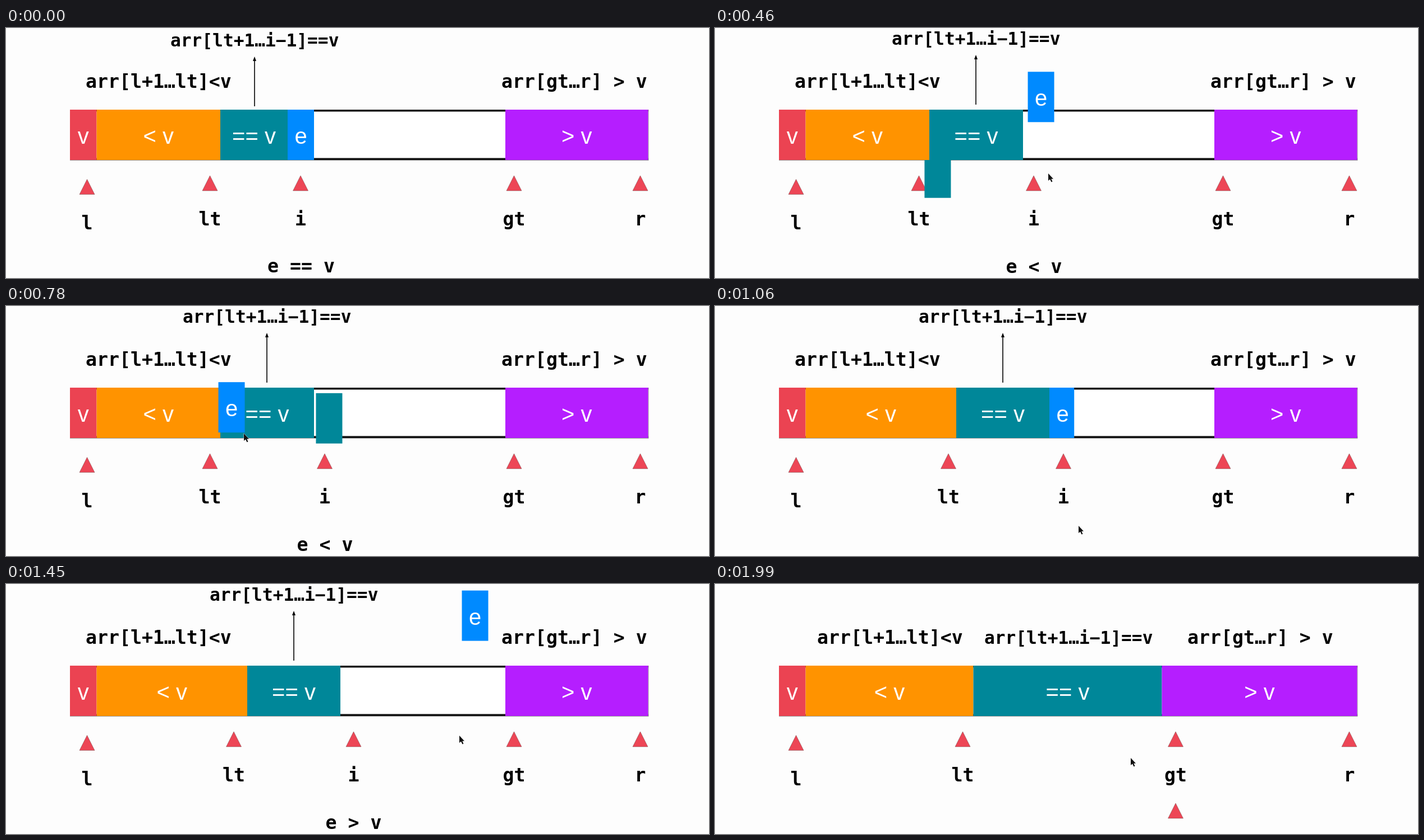
An HTML page with a canvas that plays this animation: 1253 by 447 pixels, repeating every 2070 ms.

```html
<!DOCTYPE html>
<html lang="en">
<head>
<meta charset="utf-8">
<title>Three-way partition</title>
<style>
html, body { margin: 0; width: 100%; height: 100%; overflow: hidden; background: #fdfdfd; }
canvas { display: block; }
</style>
</head>
<body>
<canvas id="stage" width="1253" height="447"></canvas>
<script>
const ctx = document.getElementById('stage').getContext('2d');
const LOOP = 2070;
// Moments at which the picture is refreshed.
const TICKS = [0, 110, 180, 250, 320, 390, 460, 540, 610, 690, 780, 840, 910, 980, 1060,
  1140, 1220, 1300, 1380, 1450, 1540, 1610, 1680, 1760, 1830, 1910, 1990];
const TOP = 146, HEIGHT = 90, CELL = 47, LEFT = 114, RIGHT = 1144.5;
const RED = '#eb4352', ORANGE = '#ff9300', TEAL = '#008799', BLUE = '#008aff', PURPLE = '#b51eff';
const MONO = '"DejaVu Sans Mono", monospace';
const SANS = '"Liberation Sans", Arial, sans-serif';

// Piecewise linear value through [time, value] keys.
function track(t, keys) {
  if (t <= keys[0][0]) return keys[0][1];
  for (let k = 1; k < keys.length; k++) {
    const [t0, a] = keys[k - 1], [t1, b] = keys[k];
    if (t < t1) return a + (b - a) * (t - t0) / (t1 - t0);
  }
  return keys[keys.length - 1][1];
}

function mono(str, x, baseline, size = 33.2, align = 'left') {
  ctx.font = `bold ${size}px ${MONO}`;
  ctx.textAlign = align;
  ctx.fillStyle = '#000';
  ctx.fillText(str, x, baseline);
}

function block(x, width, color, label = '', y = TOP) {
  ctx.fillStyle = color;
  ctx.fillRect(x, y, width, HEIGHT);
  ctx.font = `40px ${SANS}`;
  ctx.textAlign = 'center';
  ctx.fillStyle = '#fff';
  ctx.fillText(label, x + width / 2, y + 61);
}

function triangle(x, top) {
  ctx.beginPath();
  ctx.moveTo(x, top);
  ctx.lineTo(x + 13.5, top + 27);
  ctx.lineTo(x - 13.5, top + 27);
  ctx.closePath();
  ctx.fillStyle = '#ed4656';
  ctx.fill();
  ctx.lineWidth = 0.8;
  ctx.strokeStyle = 'rgba(90, 60, 60, .55)';
  ctx.stroke();
}

function pointer(name, x, drop = 0) {
  triangle(x, 264 + drop);
  mono(name, x, 353 + drop, 33.2, 'center');
}

function arrow(x, top) {
  ctx.fillStyle = '#000';
  ctx.fillRect(x - 0.8, top + 5, 1.6, 84);
  ctx.beginPath();
  ctx.moveTo(x, top);
  ctx.lineTo(x + 3, top + 8);
  ctx.lineTo(x - 3, top + 8);
  ctx.fill();
}

// The whole array; `loose` is a teal cell passing behind the coloured ranges.
function bar(orangeEnd, tealEnd, purpleStart, loose) {
  ctx.fillStyle = 'rgba(0, 0, 0, .4)';
  ctx.fillRect(LEFT, TOP + HEIGHT, RIGHT - LEFT + 1, 1);
  ctx.fillRect(RIGHT, TOP, 1, HEIGHT);
  ctx.fillStyle = '#111';
  ctx.fillRect(LEFT, TOP, RIGHT - LEFT, HEIGHT);
  ctx.fillStyle = '#fff';
  ctx.fillRect(LEFT, TOP + 3.5, RIGHT - LEFT, HEIGHT - 7);
  if (loose) block(loose.x, CELL, TEAL, '', loose.y);
  block(LEFT, 161.5 - LEFT, RED, 'v');
  block(161.5, orangeEnd - 161.5, ORANGE, '< v');
  block(orangeEnd, tealEnd - orangeEnd, TEAL, '== v');
  block(purpleStart, RIGHT - purpleStart, PURPLE, '> v');
}

// The blue cell, revealed from left to right.
function current(x, reveal) {
  if (reveal <= 0) return;
  ctx.save();
  ctx.beginPath();
  ctx.rect(x, TOP, CELL * Math.min(reveal, 1), HEIGHT + 1);
  ctx.clip();
  block(x, CELL, BLUE, 'e');
  ctx.restore();
}

// Arc from one cell to another; a positive lift goes upwards.
function arc(t, start, from, to, lift) {
  const u = Math.min(Math.max((t - start) / 483, 0), 1);
  const p = (1 - Math.cos(Math.PI * u)) / 2;
  const bulge = 3 * p * (1 - p);
  const side = Math.sign(from - to) * 69;
  return {
    x: from + (to - from) * p * p * (3 - 2 * p) + side * bulge * (1 - 2 * p),
    y: TOP - lift * bulge
  };
}

function cursor(t) {
  if (t < 390) return;
  const x = track(t, [[390, 575], [460, 594], [780, 424], [1060, 648], [1140, 655], [1450, 808], [1830, 741]]);
  const y = track(t, [[390, 280], [460, 260], [780, 228], [1060, 393], [1140, 292], [1450, 271], [1830, 311]]);
  ctx.save();
  ctx.translate(x, y);
  ctx.fillStyle = '#111';
  ctx.strokeStyle = 'rgba(255, 255, 255, .8)';
  ctx.lineWidth = 1;
  const shape = new Path2D('M0 0V13L3 10.5L5.5 15.5L7.5 14.5L5.3 9.7H9Z');
  ctx.stroke(shape);
  ctx.fill(shape);
  ctx.restore();
}

function partitioned() {
  mono('arr[l+1…lt]<v', 182, 107);
  mono('arr[lt+1…i−1]==v', 480, 107, 31.2);
  mono('arr[gt…r] > v', 842, 107);
  bar(460.5, 796.5, 796.5);
  pointer('lt', 441.5);
  pointer('gt', 821);
  triangle(821, 392);
}

function scanning(t) {
  const started = t >= 110, swapped = t >= 910;
  const swapping = t >= 339 && !swapped;
  const middle = swapped ? 513 : started ? 465 : 443;
  const rise = started ? 3 : 0;

  mono('arr[l+1…lt]<v', 142, 107);
  mono('arr[lt+1…i−1]==v', middle - 150, 33 - rise, 31.2);
  mono('arr[gt…r] > v', 883, 107);
  arrow(middle, 51 - rise);

  pointer('lt', track(t, [[910, 363.5], [1060, 416], [1140, 406]]));
  pointer('i', track(t, [[110, 525], [250, 568], [910, 568], [1060, 621], [1140, 619.5]]));
  pointer('gt', track(t, [[1680, 905.5], [1830, 866.5]]));
  bar(swapped ? 430 : 382, swapped ? 596 : started ? 549 : 502, t >= 1760 ? 845 : 890,
    swapping && arc(t, 339, 382, 549, -180));

  if (!started) {
    current(502, 1);
    mono('e == v', 466, 437);
  } else if (t < 339) {
    current(549, (t - 150) / 95);
  } else if (swapping) {
    const blue = arc(t, 339, 549, 382, 180);
    block(blue.x, CELL, BLUE, 'e', blue.y);
  } else if (t < 1140) {
    current(596, (t - 965) / 101);
  } else if (t < 1760) {
    const blue = arc(t, 1140, 596, 843, 220);
    block(blue.x, CELL, BLUE, 'e', blue.y);
    mono('e > v', 569.5, 438);
  }
  if (t >= 320 && !swapped) mono('e < v', 518.5, 438);
}

function draw(now) {
  const time = now % LOOP;
  const t = TICKS.findLast(tick => tick <= time);
  ctx.fillStyle = '#fdfdfd';
  ctx.fillRect(0, 0, 1253, 447);
  pointer('l', 144.5, 6.5);
  pointer('r', 1130.5);
  if (t >= 1910) partitioned();
  else scanning(t);
  cursor(t);
}

const begin = performance.now();
function loop() {
  draw(performance.now() - begin);
  requestAnimationFrame(loop);
}
loop();
</script>
</body>
</html>
```
